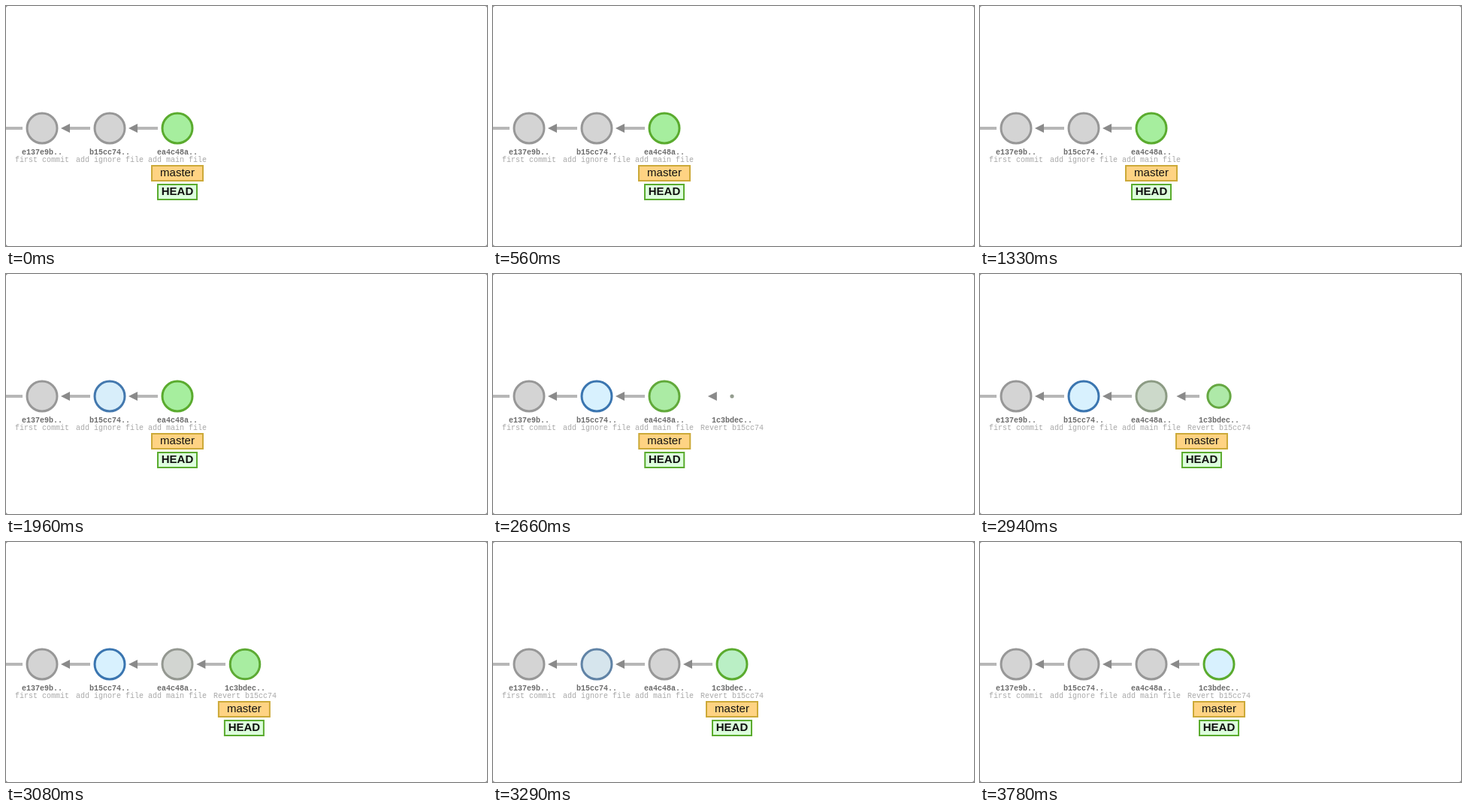
Animation of 640 by 320 pixels, one loop 4200 ms. Source, as an HTML page with a canvas:

```html
<!DOCTYPE html>
<html lang="en">
<head>
<meta charset="utf-8">
<title>Commit graph</title>
<style>
  html, body { margin: 0; width: 100%; height: 100%; overflow: hidden; background: #808080; }
  canvas { display: block; width: 640px; height: 320px; background: #fff; border-radius: 3px; }
</style>
</head>
<body>
<canvas id="stage"></canvas>
<script>
const canvas = document.getElementById('stage');
const ctx = canvas.getContext('2d');
const ratio = window.devicePixelRatio || 1;
canvas.width = 640 * ratio;
canvas.height = 320 * ratio;

const LOOP = 4200, STEP = 70, FADE = 700, Y = 163;
const MONO = '"Courier New", Courier, "Liberation Mono", monospace';
const SANS = 'Helvetica, Arial, "Liberation Sans", sans-serif';

// Each style is [fill, stroke].
const GREY = [[212, 212, 212], [151, 151, 151]];
const GREEN = [[166, 238, 158], [90, 171, 46]];
const BLUE = [[216, 241, 254], [58, 117, 176]];
const PICKED = [BLUE[0], GREEN[1]];

const clamp = v => Math.min(1, Math.max(0, v));
const lerp = (a, b, p) => a + (b - a) * p;
const mix = (a, b, p) => a.map((c, i) => c.map((v, j) => lerp(v, b[i][j], p)));
const rgb = c => `rgb(${c.map(Math.round)})`;
const cubicInOut = p => p < .5 ? 4 * p ** 3 : 1 - 4 * (1 - p) ** 3;

// The CSS "ease" curve, cubic-bezier(.25, .1, .25, 1).
function ease(x) {
  const curve = (a, b, s) => 3 * a * s * (1 - s) ** 2 + 3 * b * s * s * (1 - s) + s ** 3;
  let lo = 0, hi = 1;
  for (let i = 0; i < 24; i++) {
    const mid = (lo + hi) / 2;
    if (curve(.25, .25, mid) < x) lo = mid; else hi = mid;
  }
  return curve(.1, 1, hi);
}
const fade = (t, start) => ease(clamp((t - start) / FADE));

function text(str, x, y, font, color) {
  ctx.font = font;
  ctx.fillStyle = color;
  ctx.fillText(str, x, y);
}

function commit(x, hash, message, style, r = 20) {
  ctx.beginPath();
  ctx.arc(x, Y, r, 0, 2 * Math.PI);
  ctx.fillStyle = rgb(style[0]);
  ctx.strokeStyle = rgb(style[1]);
  ctx.lineWidth = 3;
  ctx.fill();
  ctx.stroke();
  text(hash + '..', x, 198, `bold 10px ${MONO}`, '#6c6c6c');
  text(message, x, 208, `10px ${MONO}`, '#a8a8a8');
}

function arrow(from, tip) {
  ctx.fillStyle = '#b7b7b7';
  if (from > tip + 11) ctx.fillRect(tip + 11, Y - 2, from - tip - 11, 4);
  ctx.fillStyle = '#8a8a8a';
  ctx.beginPath();
  ctx.moveTo(tip, Y);
  ctx.lineTo(tip + 12, Y - 6);
  ctx.lineTo(tip + 12, Y + 6);
  ctx.fill();
}

function tag(x, y, w, label, weight, fill, stroke) {
  ctx.fillStyle = fill;
  ctx.strokeStyle = stroke;
  ctx.lineWidth = 2;
  ctx.beginPath();
  ctx.rect(x - w / 2, y, w, 20);
  ctx.fill();
  ctx.stroke();
  text(label, x, y + 14, `${weight} 15px ${SANS}`, '#111');
}

function draw(t) {
  ctx.setTransform(ratio, 0, 0, ratio, 0, 0);
  ctx.clearRect(0, 0, 640, 320);
  ctx.textAlign = 'center';

  const grow = cubicInOut(clamp((t - 2610) / 550));
  const advance = fade(t, 2580);
  const settle = fade(t, 3115);
  const marked = mix(GREY, BLUE, fade(t, 1520));

  arrow(22, -17);
  arrow(112, 73);
  arrow(202, 163);
  commit(48, 'e137e9b', 'first commit', GREY);
  commit(138, 'b15cc74', 'add ignore file', mix(marked, GREY, settle));
  commit(228, 'ea4c48a', 'add main file', mix(GREEN, GREY, advance));
  if (t >= 2520) {
    arrow(292, lerp(286, 253, grow));
    const style = mix(mix(GREY, GREEN, advance), PICKED, settle);
    commit(318, '1c3bdec', 'Revert b15cc74', style, lerp(1, 20, grow));
  }

  const x = lerp(228, 318, grow);
  tag(x, 213, 68, 'master', 'normal', '#ffd383', '#cca938');
  tag(x, 238, 52, 'HEAD', 'bold', '#ddffdd', '#5aab2e');
}

function frame() {
  const t = performance.now() % LOOP;
  draw(Math.min(3780, Math.floor(t / STEP) * STEP));
  requestAnimationFrame(frame);
}
frame();
</script>
</body>
</html>
```
